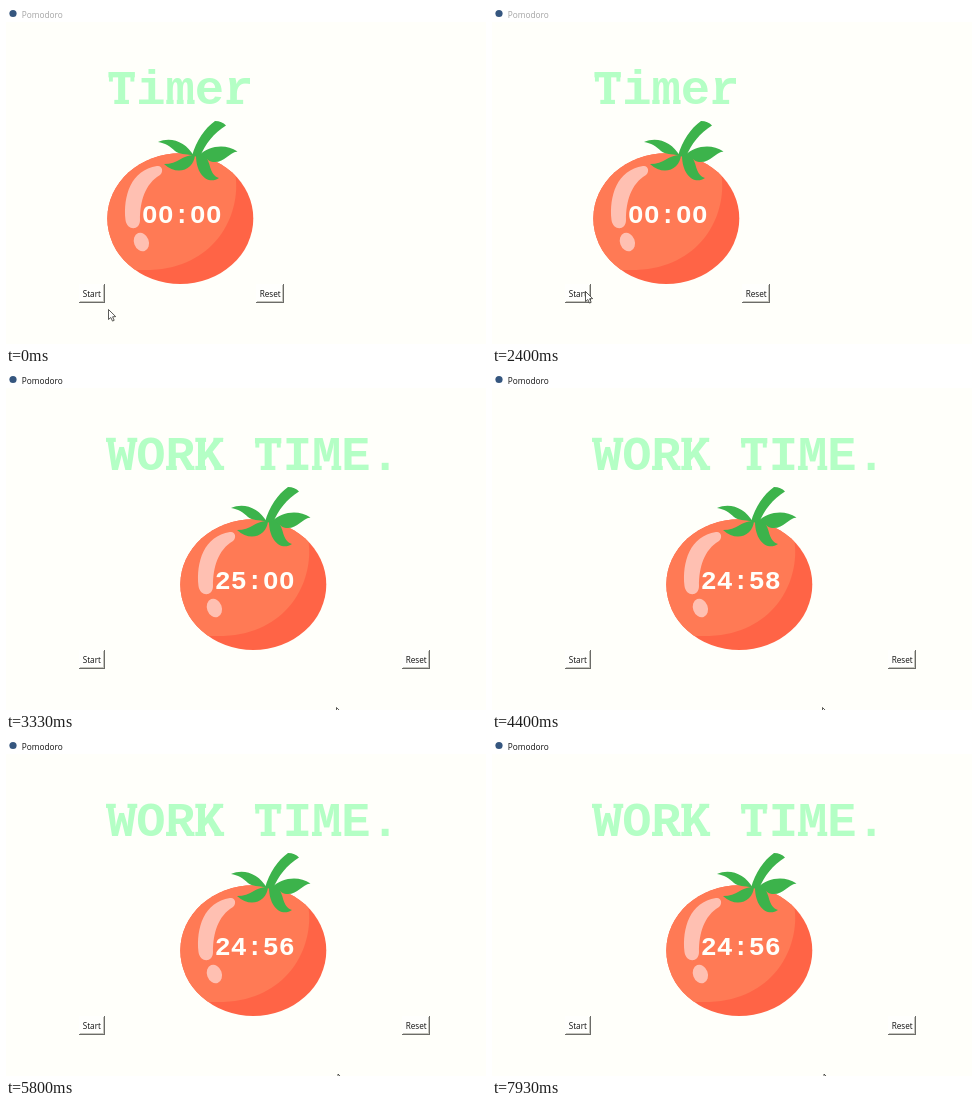
Animation, 480 px wide and 338 px high, one loop 8 s. Source, as an HTML page with a canvas:

```html
<!DOCTYPE html>
<html lang="en">
<head>
<meta charset="utf-8">
<title>Pomodoro</title>
<style>
  html, body { margin: 0; width: 100%; height: 100%; overflow: hidden; background: #fffffa; }
  canvas { display: block; }
</style>
</head>
<body>
<canvas id="stage" width="480" height="338"></canvas>
<script>
(() => {
  const ctx = document.getElementById('stage').getContext('2d');
  const LOOP = 8000;
  const WORK_START = 2670;
  const MONO = '"Liberation Mono", "Courier New", monospace';
  const SANS = '"Open Sans", sans-serif';
  const LIGHT = '#ff7a55', DARK = '#ff6446', PINK = '#ffc0b2', GREEN = '#3cb34b';

  // Slabs in em: centre x, baseline offset, width, height.
  const foot = (x, w = 0.2) => [x, 0, w, 0.085];
  const cap = (x, w = 0.2) => [x, 0.575, w, 0.085];
  const SLABS = {
    T: [foot(0.3, 0.3), [0.08, 0.46, 0.08, 0.18], [0.52, 0.46, 0.08, 0.18]],
    W: [cap(0.08), cap(0.52)],
    R: [foot(0.12, 0.22), foot(0.52, 0.14)],
    K: [foot(0.12, 0.22), foot(0.5), cap(0.12, 0.22), cap(0.48)],
    M: [foot(0.1), foot(0.5)],
    m: [foot(0.09, 0.15), foot(0.3, 0.14), foot(0.52, 0.15)],
    r: [foot(0.22, 0.34)]
  };

  function fillPath(d, color) {
    ctx.fillStyle = color;
    ctx.fill(new Path2D(d));
  }

  function ellipse(x, y, rx, ry, color, turn = 0) {
    ctx.beginPath();
    ctx.ellipse(x, y, rx, ry, turn, 0, Math.PI * 2);
    ctx.fillStyle = color;
    ctx.fill();
  }

  function write(str, x, y, font, color) {
    ctx.font = font;
    ctx.fillStyle = color;
    ctx.fillText(str, x, y);
  }

  function heading(str, x, y) {
    const size = 48.8;
    write(str, x, y, `bold ${size}px ${MONO}`, '#b4ffc5');
    [...str].forEach((ch, i) => {
      const left = x + i * size * 0.6;
      for (const [cx, up, w, h] of SLABS[ch] || []) {
        ctx.fillRect(left + (cx - w / 2) * size, y - (up + h) * size, w * size, h * size);
      }
    });
  }

  function clock(str, x, y) {
    const size = 26.6;
    write(str, x, y, `bold ${size}px ${MONO}`, '#fffffa');
    // Open zeros: hide the centre dot.
    [...str].forEach((ch, i) => {
      if (ch === '0') {
        ellipse(x + (i + 0.5) * size * 0.6, y - size * 0.33, size * 0.085, size * 0.15, LIGHT);
      }
    });
  }

  function button(label, x, width) {
    const y = 278, height = 19;
    ctx.fillStyle = '#fffffd';
    ctx.fillRect(x, y, width, height);
    ctx.fillStyle = '#c4c4bc';
    ctx.fillRect(x + 1, y + height - 2, width - 2, 1);
    ctx.fillRect(x + width - 2, y + 1, 1, height - 2);
    ctx.fillStyle = '#6c6c68';
    ctx.fillRect(x, y + height - 1, width, 1);
    ctx.fillRect(x + width - 1, y, 1, height);
    write(label, x + 3.7, 290.5, `8.2px ${SANS}`, '#111');
  }

  function tomato(shift) {
    ctx.save();
    ctx.translate(shift, 0);

    ctx.save();
    ctx.beginPath();
    ctx.ellipse(174.3, 212.6, 73, 65.4, 0, 0, Math.PI * 2);
    ctx.clip();
    ctx.fillStyle = DARK;
    ctx.fillRect(100, 145, 150, 135);
    fillPath('M228 162 C238 200 215 264 139 264 L95 264 V140 H228Z', LIGHT);
    ctx.restore();

    fillPath('M151 160 C156 159 158 165 154 169 C139 178 134 195 134 214 ' +
             'C134 225 121 225 119.5 214 C117 190 125 164 151 160Z', PINK);
    ellipse(135.4, 236, 7.4, 9.5, PINK, -0.35);

    fillPath('M186 150 C190 135 199 122 209 115 Q216 115 220 119.5 C208 127 199 138 194 151Z', GREEN);
    fillPath('M152 136 C165 130 180 136 188 150 C178 147 174 149 169 145 C164 140 159 137 152 136Z', GREEN);
    fillPath('M158 158 C173 158 177 148 189 149 C188 163 172 171 158 158Z', GREEN);
    fillPath('M190 149 L198 149 C206 156 202 168 213 172 C203 179 190 170 190 149Z', GREEN);
    fillPath('M193 149 C203 140 219 137 231.5 145.5 C222 147 219 157 207 156 C201 155 199 150 193 149Z', GREEN);
    ctx.restore();
  }

  function pointer(x, y) {
    const arrow = new Path2D('M0 0 V10 L2.3 8 L4 11.6 L5.7 10.8 L4.1 7.3 L7.2 7.1Z');
    ctx.save();
    ctx.translate(x, y);
    ctx.fillStyle = '#fff';
    ctx.fill(arrow);
    ctx.strokeStyle = '#33332e';
    ctx.lineWidth = 0.8;
    ctx.stroke(arrow);
    ctx.restore();
  }

  function pointerAt(t) {
    if (t < 600) return [102.5, 303.5];
    if (t < WORK_START) return [93.5, 285.5];
    if (t >= 5800) return [332, 336];
    const p = Math.min(1, Math.max(0, (t - 2730) / 470));
    const ease = 1 - (1 - p) ** 2;
    return [321.5 + 9 * ease, 331.5 + 4 * ease];
  }

  function clockAt(t) {
    if (t < WORK_START) return '00:00';
    if (t < 3400) return '25:00';
    const left = 59 - [4400, 5400, 5800].filter(tick => t >= tick).length;
    return '24:' + left;
  }

  function draw(t) {
    const working = t >= WORK_START;
    const shift = working ? 73 : 0;

    ctx.fillStyle = '#fffffa';
    ctx.fillRect(0, 0, 480, 338);
    ctx.fillStyle = '#fff';
    ctx.fillRect(0, 0, 480, 16);
    ellipse(7, 7.5, 3.6, 3.6, '#35567f');
    write('Pomodoro', 15.7, 11.5, `8.3px ${SANS}`, working ? '#111' : '#a3a3a3');

    heading(working ? 'WORK TIME.' : 'Timer', 101, 98);
    tomato(shift);
    clock(clockAt(t), 135.8 + shift, 217);
    button('Start', 73, 26);
    button('Reset', working ? 396 : 250, 28);
    pointer(...pointerAt(t));
  }

  function tick() {
    draw(performance.now() % LOOP);
    requestAnimationFrame(tick);
  }
  tick();
})();
</script>
</body>
</html>
```
